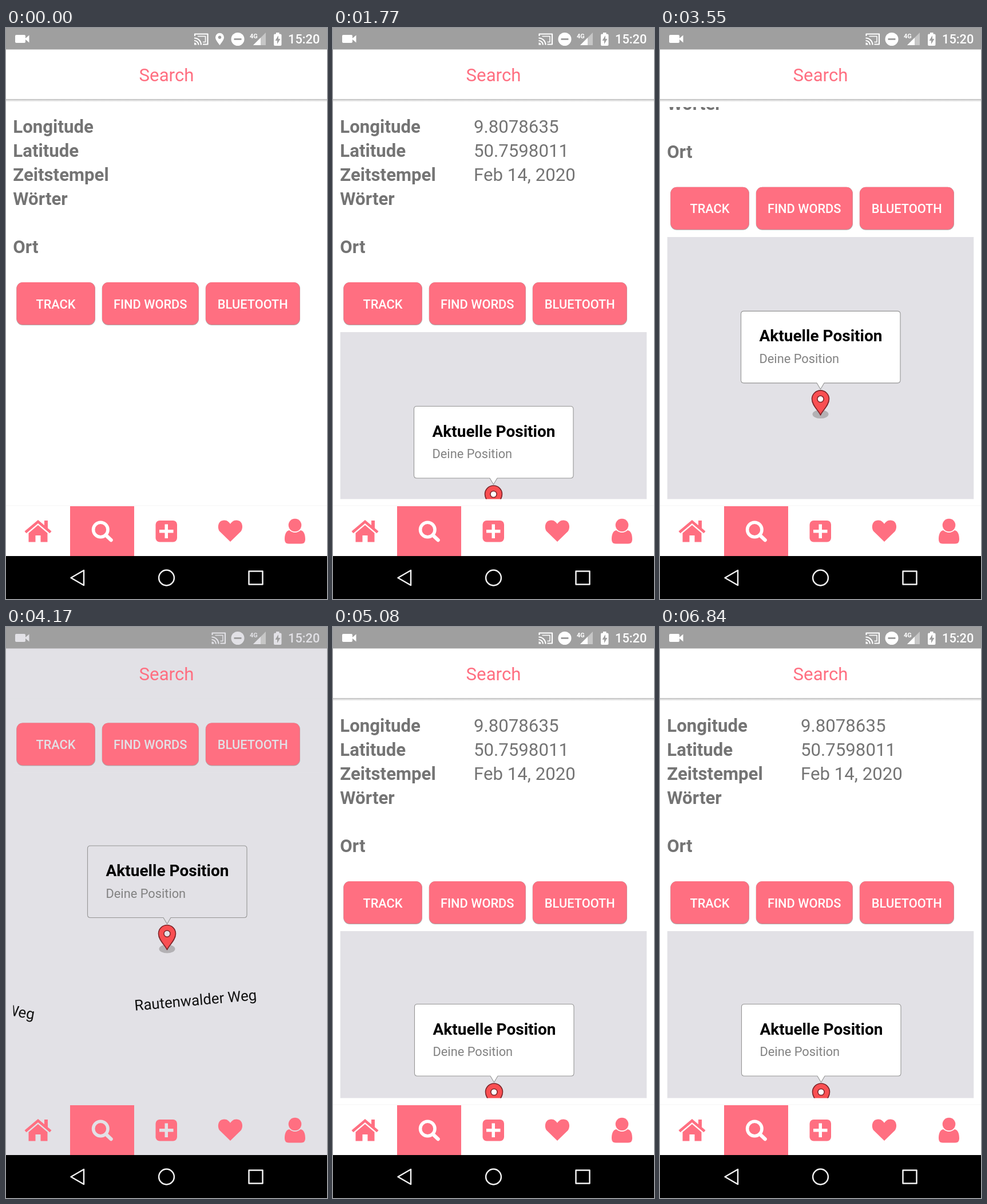
Recreate the animation shown at these times as an HTML page with a canvas. Size 561 by 997 pixels, loop 7.12 s.

```html
<!DOCTYPE html>
<html lang="de">
<head>
<meta charset="utf-8">
<title>Search</title>
<style>
  html, body { margin: 0; width: 100%; height: 100%; overflow: hidden; background: #fff; }
  canvas { display: block; width: 100vw; height: 100vh; }
</style>
</head>
<body>
<canvas id="stage"></canvas>
<script>
const W = 561, H = 997, LOOP = 7120;
const PINK = '#ff6f81', GREY = '#747474', MAP = '#e2e1e6', BAR = '#9f9f9f';
const FONT = 'Roboto, sans-serif';

// When each part of the screen changes, in ms
const LOCATED = 670, MAP_IN = 1170, MARKER_IN = 1550, STREETS_IN = 3950;
const DIM = [4170, 4270];
const SCROLL = [
  [3230, 6], [3350, 55], [3450, 115], [3550, 172.5], [3650, 212], [3750, 240],
  [3850, 258], [3950, 270], [4050, 276.5], [4570, 276.5],
  [4670, 235], [4770, 150], [4870, 65], [4980, 0]
];

const canvas = document.getElementById('stage');
const g = canvas.getContext('2d');
const dpr = window.devicePixelRatio || 1;
canvas.width = Math.round(W * dpr);
canvas.height = Math.round(H * dpr);
g.scale(dpr, dpr);

let white = '#fff';

function scrollAt(t) {
  if (t < SCROLL[0][0]) return 0;
  for (let i = 1; i < SCROLL.length; i++) {
    const [t0, y0] = SCROLL[i - 1], [t1, y1] = SCROLL[i];
    if (t < t1) return y0 + (y1 - y0) * (t - t0) / (t1 - t0);
  }
  return 0;
}

function hold(t) {
  const start = SCROLL[0][0], step = 103;
  return t < start ? t : start + Math.floor((t - start + 12) / step) * step;
}

function rect(x, y, w, h, color) {
  g.fillStyle = color;
  g.fillRect(x, y, w, h);
}

function round(x, y, w, h, r, color) {
  g.beginPath();
  g.roundRect(x, y, w, h, r);
  g.fillStyle = color;
  g.fill();
}

function disc(x, y, r, color) {
  g.beginPath();
  g.arc(x, y, r, 0, 7);
  g.fillStyle = color;
  g.fill();
}

function shape(d, color) {
  g.fillStyle = color;
  g.fill(new Path2D(d));
}

function line(d, color, width) {
  g.strokeStyle = color;
  g.lineWidth = width;
  g.stroke(new Path2D(d));
}

function text(s, x, y, size, color, weight = 400, align = 'left') {
  g.font = `${weight} ${size}px ${FONT}`;
  g.textAlign = align;
  g.fillStyle = color;
  g.fillText(s, x, y);
}

function turned(s, x, y, degrees, size, align) {
  g.save();
  g.translate(x, y);
  g.rotate(degrees * Math.PI / 180);
  text(s, 0, 0, size, '#111', 400, align);
  g.restore();
}

function statusBar(t) {
  rect(0, 0, W, 37.5, BAR);
  round(16, 12, 18, 14, 2, white);
  shape('M34 18 L40.5 12.5 V25.5 L34 20 Z', white);

  g.save();
  if (t >= LOCATED) g.translate(30.5, 0);
  line('M330 14 V10.5 H352.5 V28.5 H344', white, 2.2);
  line('M335 14.5 H348.5 V24.5 H344', white, 1.5);
  line('M329 17.5 A12 12 0 0 1 341 29.5 M329 22 A7.5 7.5 0 0 1 336.5 29.5', white, 2.2);
  shape('M329 25.5 A4 4 0 0 1 333 29.5 H329 Z', white);
  g.restore();

  if (t < LOCATED) {
    shape('M373.5 30 C369 24 366 20 366 16.3 A7.5 7.5 0 0 1 381 16.3 C381 20 378 24 373.5 30 Z', white);
    disc(373.5, 16.3, 2.7, BAR);
  }

  disc(405, 19.5, 11.5, white);
  rect(398.5, 18, 13, 3, BAR);

  shape('M432 30 L454 8 V30 Z', '#c6c6c6');
  shape('M432 30 L445 17 V30 Z', white);
  text('4G', 426, 17.5, 11, white, 700);

  round(468, 10.5, 13.5, 20.5, 2, white);
  rect(472, 8, 5.5, 3, white);
  shape('M476 13 L470.5 22 H474 V28 L479.5 19 H476 Z', BAR);
  text('15:20', 493, 27, 21.8, white, 500);
}

function header(dim) {
  rect(0, 37.5, W, 87, white);
  if (!dim) {
    const fade = g.createLinearGradient(0, 124, 0, 129);
    fade.addColorStop(0, '#bdbdbd');
    fade.addColorStop(1, '#ffffff');
    rect(0, 124, W, 5, fade);
  }
  text('Search', 280.5, 93, 31.2, PINK, 400, 'center');
}

function button(label, x, w) {
  round(x - 0.3, 444, w + 0.8, 75, 11, '#aaa3a4');
  round(x, 444, w, 74, 11, PINK);
  text(label, x + w / 2, 489.5, 21.8, white, 500, 'center');
}

function marker() {
  g.beginPath();
  g.ellipse(280.5, 840.5, 14, 7.5, 0, 0, 7);
  g.fillStyle = '#b3b1b4';
  g.fill();
  const pin = 'M280.5 842 C277 834 265.5 825 265.5 814 A15 15 0 0 1 295.5 814 C295.5 825 284 834 280.5 842 Z';
  shape(pin, '#f94f52');
  line(pin, '#7c2429', 1.6);
  disc(280.5, 814, 6.3, '#7c2429');
  disc(280.5, 814, 4.8, white);
}

function callout() {
  const d = 'M146.5 660.5 H415 Q420 660.5 420 665.5 V781 Q420 786 415 786 H287 ' +
    'L280.5 797 L274 786 H146.5 Q141.5 786 141.5 781 V665.5 Q141.5 660.5 146.5 660.5 Z';
  shape(d, white);
  line(d, '#959595', 1.1);
  text('Aktuelle Position', 173.5, 713.5, 28, '#000', 700);
  text('Deine Position', 173.5, 751, 21.8, '#828282');
}

function mapView(t) {
  g.save();
  g.beginPath();
  g.rect(12.5, 531, 536, 620);
  g.clip();
  rect(12.5, 531, 536, 620, MAP);
  if (t >= STREETS_IN) {
    turned('Rautenwalder Weg', 332, 937, -5, 25.8, 'center');
    turned('Weg', -2, 953, 10, 26, 'left');
    g.translate(1, -2);
  }
  if (t >= MARKER_IN) {
    marker();
    callout();
  }
  g.restore();
}

function content(t) {
  g.save();
  g.beginPath();
  g.rect(12, 138, 537, 684.5);
  g.clip();
  g.translate(0, -scrollAt(hold(t)));
  ['Longitude', 'Latitude', 'Zeitstempel', 'Wörter', '', 'Ort'].forEach((s, i) =>
    text(s, 12.3, 183 + i * 42, 31.2, GREY, 700));
  if (t >= LOCATED) {
    ['9.8078635', '50.7598011', 'Feb 14, 2020'].forEach((s, i) =>
      text(s, 246, 183 + i * 42, 31.2, GREY));
  }
  button('TRACK', 18.5, 137);
  button('FIND WORDS', 168, 168.5);
  button('BLUETOOTH', 349, 164.5);
  if (t >= MAP_IN) mapView(t);
  g.restore();
}

function tabs(dim) {
  rect(0, 834, W, 88, white);
  if (!dim) rect(0, 833.5, W, 1, '#f6f6f6');
  rect(112, 835, 112, 87, PINK);

  g.lineJoin = 'miter';
  line('M34 880.5 L56 862 L78 880.5', PINK, 4.6);
  shape('M67 860 H73 V874 L67 869 Z', PINK);
  shape('M39.5 882 L56 868 L72.5 882 V897.5 H60.5 V886 H51.5 V897.5 H39.5 Z', PINK);

  g.lineCap = 'round';
  line('M174.5 885.5 L183.5 894', white, 6.5);
  g.lineCap = 'butt';
  g.beginPath();
  g.arc(165.3, 876, 12.7, 0, 7);
  g.lineWidth = 5.6;
  g.stroke();

  round(261.5, 860, 37.5, 37.5, 7, PINK);
  rect(268, 876, 24.5, 5.5, white);
  rect(277.5, 866.5, 5.5, 24.5, white);

  shape('M392 897 L373.5 879 C369 874 369.5 859.5 381.5 859.5 C387 859.5 390 863 392 866 ' +
    'C394 863 397 859.5 402.5 859.5 C414.5 859.5 415 874 410.5 879 Z', PINK);

  shape('M495 877 C489 878 487 885 487 893 Q487 900.5 494 900.5 H516 Q523 900.5 523 893 ' +
    'C523 885 521 878 515 877 Q505 885 495 877 Z', PINK);
  disc(505, 868, 12.3, white);
  disc(505, 868, 11.3, PINK);
}

function systemKeys() {
  rect(0, 922, W, 75, '#000');
  g.lineJoin = 'round';
  line('M113.5 960 L136 947 V973 Z', '#f2f2f2', 2.5);
  line('M424.5 948.5 H448.5 V971.5 H424.5 Z', '#f2f2f2', 2.5);
  g.beginPath();
  g.arc(280.5, 960, 13.4, 0, 7);
  g.stroke();
}

function draw(now) {
  const t = now % LOOP;
  const dim = t >= DIM[0] && t < DIM[1];
  white = dim ? MAP : '#fff';
  rect(0, 0, W, H, white);
  content(t);
  header(dim);
  statusBar(t);
  tabs(dim);
  systemKeys();
}

const begin = performance.now();
function tick() {
  draw(performance.now() - begin);
  requestAnimationFrame(tick);
}
tick();
</script>
</body>
</html>
```
